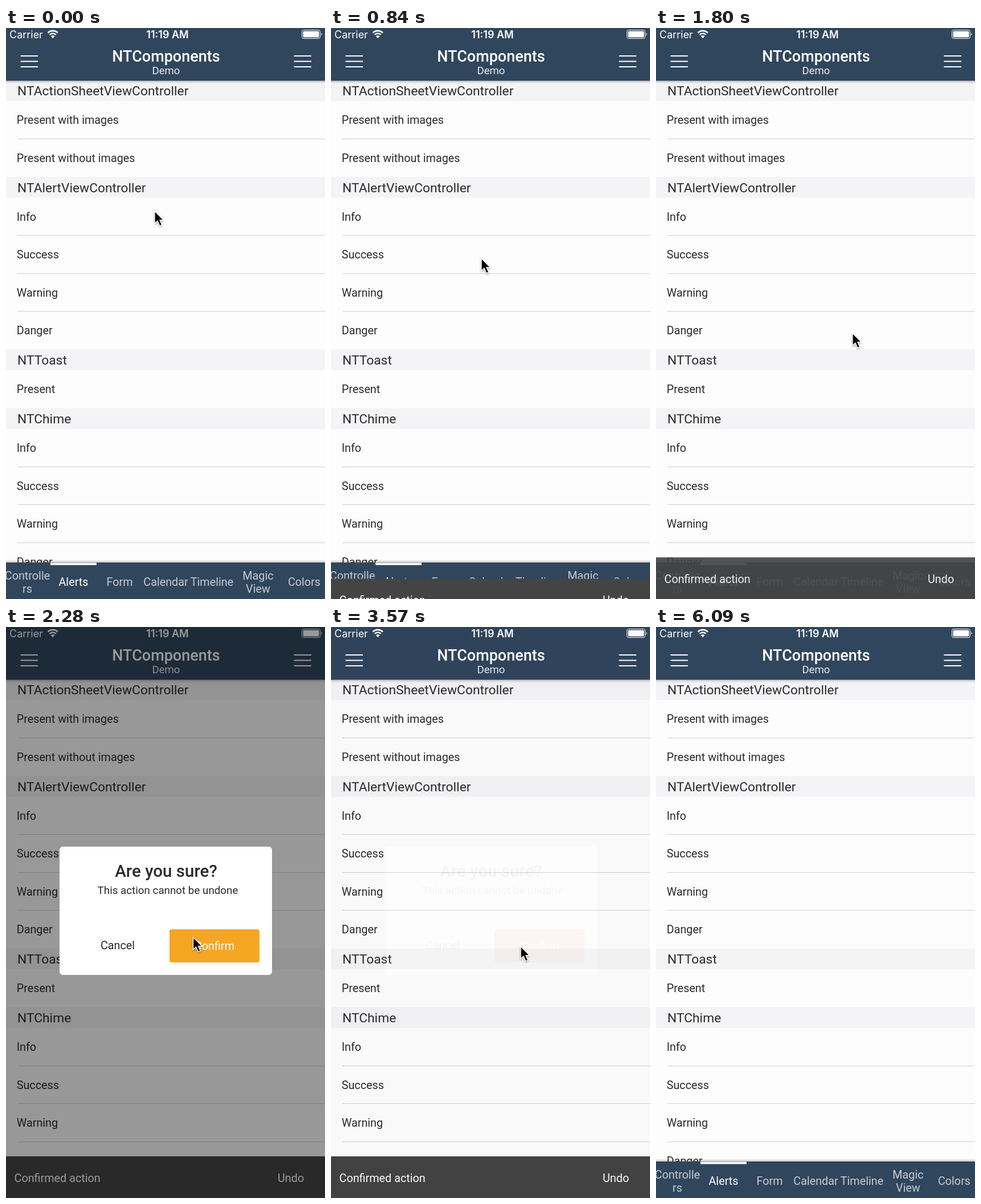
Recreate the animation shown at these times as an HTML page. Size 560 by 1001 pixels, loop 6120 ms.

```html
<!DOCTYPE html>
<html lang="en">
<head>
<meta charset="utf-8">
<title>Alerts demo</title>
<style>
  html, body { margin: 0; width: 100%; height: 100%; overflow: hidden; background: #fdfdfd; }
  svg { display: block; width: 100%; height: 100%; font-family: Roboto, sans-serif; font-size: 19.8px; }
  .system { font-family: Inter, sans-serif; font-size: 18px; }
  .medium { font-weight: 500; }
</style>
</head>
<body>
<svg viewBox="0 0 560 1001" preserveAspectRatio="none">
  <defs>
    <linearGradient id="shade" x2="0" y2="1">
      <stop stop-color="#000" stop-opacity=".2"/>
      <stop offset="1" stop-color="#000" stop-opacity="0"/>
    </linearGradient>
    <filter id="soft" x="-50%" y="-50%" width="200%" height="200%">
      <feDropShadow dx="0" dy="1.5" stdDeviation="1.5" flood-opacity=".4"/>
    </filter>
  </defs>
  <rect width="560" height="1001" fill="#fdfdfd"/>
  <g id="list" fill="#2b2b2b"></g>

  <rect y="92" width="560" height="6" fill="url(#shade)"/>
  <rect width="560" height="92.5" fill="#30465d"/>
  <g fill="#fff" text-anchor="middle">
    <text x="281" y="58.5" font-size="27" class="medium">NTComponents</text>
    <text x="281" y="80.5" font-size="18.6" fill="#e8ebee">Demo</text>
    <text x="283.5" y="17.5" class="system" font-weight="600">11:19 AM</text>
    <text x="6" y="17.5" class="system" text-anchor="start">Carrier</text>
  </g>
  <path d="M25.5 49H56M25.5 58.5H56M25.5 68H56M505.5 49H536M505.5 58.5H536M505.5 68H536" stroke="#fff" stroke-width="2"/>
  <g fill="none" stroke="#fff" stroke-width="2.6">
    <path d="M73.500 8.500a12.300 12.300 0 0 1 17.400 0M76.700 11.800a7.800 7.800 0 0 1 11 0"/>
    <path d="M82.200 18l-3.300-3.500a4.600 4.600 0 0 1 6.600 0z" fill="#fff" stroke="none"/>
  </g>
  <rect x="519.500" y="3.500" width="32" height="15" rx="3" fill="none" stroke="#fff"/>
  <rect x="521.500" y="5.500" width="28" height="11" rx="1.500" fill="#fff"/>
  <path d="M553.500 8.500q2.500 2.500 0 5z" fill="#fff"/>

  <rect y="-937" width="560" height="5" transform="scale(1 -1)" fill="url(#shade)"/>
  <rect y="937" width="560" height="64" fill="#30465d"/>
  <rect x="78" y="937.500" width="81" height="4" fill="#fff"/>
  <g id="tabs" text-anchor="middle"></g>

  <g id="snackbars" fill="#fff"></g>

  <g id="dialog">
    <rect width="560" height="1001" opacity=".4"/>
    <rect x="94" y="385" width="373" height="225" rx="6" fill="#fff"/>
    <g text-anchor="middle" fill="#2b2b2b">
      <text x="281" y="438" font-size="29.500" class="medium">Are you sure?</text>
      <text x="284" y="468" font-size="18.800">This action cannot be undone</text>
      <text x="196" y="565">Cancel</text>
      <rect id="confirm" x="287" y="530" width="158" height="58" rx="4"/>
      <text x="366" y="566" fill="#fff">Confirm</text>
    </g>
  </g>

  <g id="toast">
    <rect width="560" height="26" fill="#444"/>
    <text x="281" y="17" font-size="17.900" class="medium" fill="#fff" text-anchor="middle">Toast Action</text>
  </g>
  <path id="cursor" d="M0 0V21.500L5 17L8.800 25.800L12.600 24.100L8.900 15.600H15.400Z" stroke="#fff" stroke-width="1.300" filter="url(#soft)"/>
</svg>
<script>
const LOOP = 6120;
const $ = id => document.getElementById(id);
const clamp = v => Math.min(1, Math.max(0, v));
const ramp = (t, start, length) => clamp((t - start) / length);
const smooth = v => v * v * (3 - 2 * v);
const text = (x, y, label, attrs = '') => `<text x="${x}" y="${y}" ${attrs}>${label}</text>`;

const sections = [
  [91.5, 'NTActionSheetViewController', ['Present with images', 'Present without images']],
  [261, 'NTAlertViewController', ['Info', 'Success', 'Warning', 'Danger']],
  [563.5, 'NTToast', ['Present']],
  [666.5, 'NTChime', ['Info', 'Success', 'Warning', 'Danger']]
];
const ROW = 66.5, HEADER = 36.5;
$('list').innerHTML = sections.map(([top, title, rows]) =>
  `<rect y="${top}" width="560" height="${HEADER}" fill="#f4f4f6"/>` +
  text(20, top + 26.5, title, 'font-size="22.8"') +
  rows.map((label, i) => {
    const y = top + HEADER + i * ROW;
    const line = i < rows.length - 1
      ? `<rect x="20" y="${Math.floor(y + ROW - .5)}" width="540" height="1" fill="#cfcfd6"/>` : '';
    return text(18.7, y + 40, label) + line;
  }).join('')
).join('');

const tabs = ['Controlle rs', 'Alerts', 'Form', 'Calendar', 'Timeline', 'Magic View', 'Colors'];
$('tabs').innerHTML = tabs.map((tab, i) => {
  const lines = tab.split(' ');
  const first = lines.length > 1 ? 967 : 978;
  return lines.map((line, n) =>
    text(37.5 + i * 81, first + n * 23, line, `fill="${i === 1 ? '#fff' : '#c5cbd1'}"`)).join('');
}).join('');

// [slide-in start, fade-out start]
const snacks = [[780, 1785], [1850, 2760], [2700, 3720], [3640, 4220]];
$('snackbars').innerHTML = snacks.map(() =>
  '<g><rect y="928" width="560" height="74" fill="#444"/>' +
  text(14.5, 973, 'Confirmed action') + text(477, 973, 'Undo') + '</g>').join('');

// [fade-in start, fade-out end, button colour]
const dialogs = [
  [120, 640, '#2f9be8'], [930, 1640, '#4caf50'],
  [2080, 2620, '#f5a623'], [2950, 3576, '#f44336']
];

// [time, x, y]
const cursorPath = [
  [0, 261, 321], [120, 261, 321], [430, 335, 558], [570, 335, 558],
  [840, 264, 404], [930, 264, 404], [1250, 338, 559], [1640, 345, 555],
  [1800, 345, 535], [2000, 280, 466], [2080, 280, 466], [2350, 338, 559],
  [2560, 338, 559], [2850, 294, 546], [2950, 294, 546], [3200, 333, 560],
  [3580, 333, 560], [3900, 288, 632], [4050, 288, 632], [4500, 295, -6], [4560, 296, -40]
];

function moveCursor(t) {
  const next = cursorPath.findIndex(point => point[0] > t);
  $('cursor').style.display = next < 0 ? 'none' : '';
  if (next < 0) return;
  const [t0, x0, y0] = cursorPath[next - 1], [t1, x1, y1] = cursorPath[next];
  const k = smooth((t - t0) / (t1 - t0));
  $('cursor').setAttribute('transform', `translate(${x0 + (x1 - x0) * k} ${y0 + (y1 - y0) * k})`);
}

function render(t) {
  snacks.forEach(([start, end], i) => {
    const bar = $('snackbars').children[i];
    bar.setAttribute('transform', `translate(0 ${74 * (1 - smooth(ramp(t, start, 123)))})`);
    bar.setAttribute('opacity', 1 - ramp(t, end, 180));
  });

  const open = dialogs.find(([start, end]) => t >= start && t < end);
  $('dialog').style.display = open ? '' : 'none';
  if (open) {
    const [start, end, colour] = open;
    $('dialog').setAttribute('opacity', Math.min(ramp(t, start, 120), clamp((end - t) / 150)));
    $('confirm').setAttribute('fill', colour);
  }

  const shown = smooth(ramp(t, 4080, 120)) * (1 - smooth(ramp(t, 5400, 120)));
  $('toast').setAttribute('transform', `translate(0 ${-26 * (1 - shown)})`);
  moveCursor(t);
}

const began = performance.now();
function tick() {
  render((performance.now() - began) % LOOP);
  requestAnimationFrame(tick);
}
tick();
</script>
</body>
</html>
```
